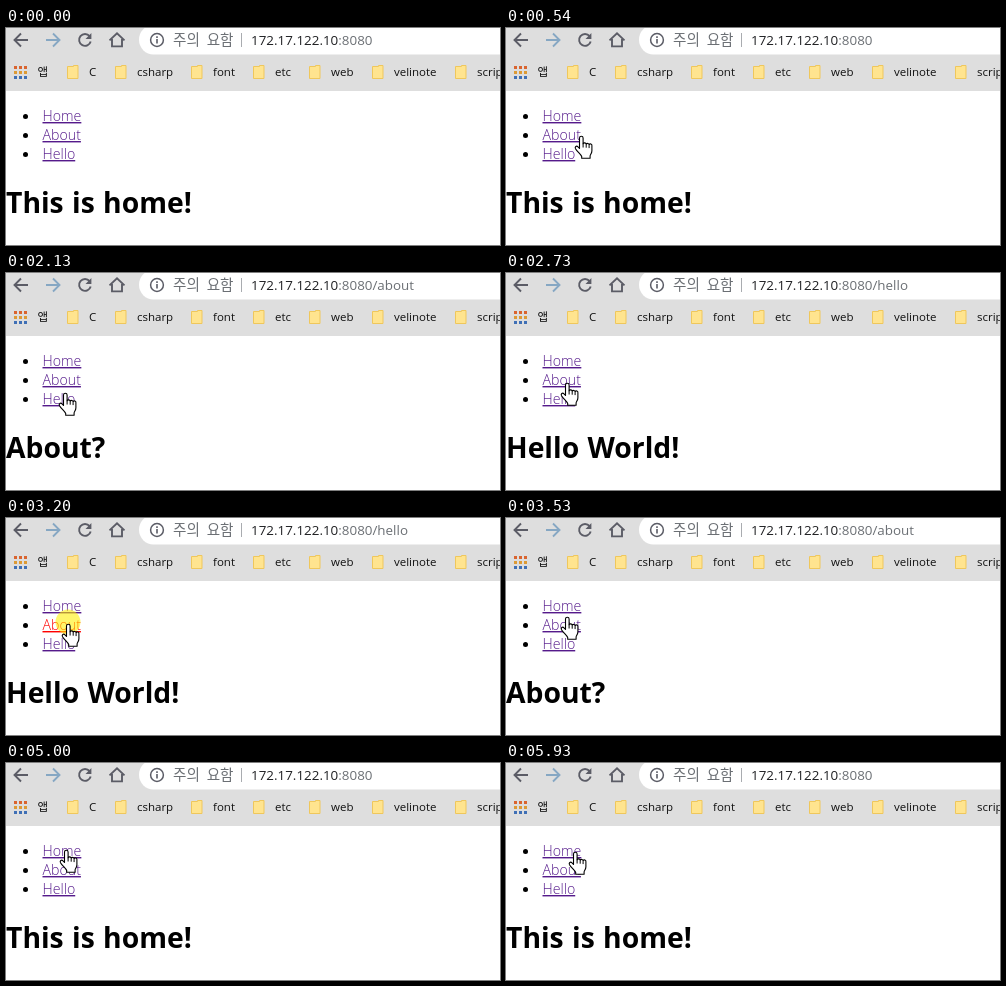
Write an HTML page that moves like this. It is 494 px wide and 217 px high and loops after 6.18 s.

```html
<!DOCTYPE html>
<html lang="ko">
<head>
<meta charset="utf-8">
<title>Page navigation</title>
<style>
html, body { margin: 0; width: 100%; height: 100%; overflow: hidden; background: #fff; }
svg { display: block; width: 494px; height: 217px; }
text { font-family: "Open Sans", "Noto Sans CJK KR", "Noto Sans CJK", "Noto Sans", sans-serif; white-space: pre; }
.mark { font-size: 11.5px; fill: #111; }
.notice { font-size: 14.6px; word-spacing: 3px; }
.url { font-size: 13.4px; fill: #202124; }
.dim { fill: #6b6f74; }
.link { font-size: 14.2px; font-weight: 300; fill: #551a8b; text-decoration: underline; }
.link.active { fill: #f00; }
.title { font-size: 28.3px; font-weight: 700; word-spacing: 1px; }
.icon { fill: none; stroke: #5b5c66; stroke-width: 1.9; }
</style>
</head>
<body>
<svg viewBox="0 0 494 217">
  <rect width="494" height="217" fill="#fff"/>
  <rect width="494" height="63" fill="#dedede"/>
  <rect x="133" y="-3" width="400" height="29.5" rx="14.7" fill="#fff"/>
  <g class="icon">
    <path d="M22 12H9M15 5.5L8.5 12L15 18.5"/>
    <path d="M40 12H53M47 5.5L53.5 12L47 18.5" stroke="#86a7c3" style="stroke:#86a7c3"/>
    <path d="M83.6 8.2A5.9 5.9 0 1 0 84.7 13.5"/>
    <path d="M85.4 5V10.9H79.5Z" style="fill:#5b5c66;stroke:none"/>
    <path d="M103.5 12.4L111 5.4L118.5 12.4M106 11V18.4H116V11"/>
    <circle cx="151" cy="12" r="6.4" style="stroke-width:1.5"/>
    <path d="M151 11V15.6M151 8.3V9.9" style="stroke-width:1.6"/>
  </g>
  <text x="167" y="17" class="notice dim">주의 요함</text>
  <path d="M235.5 5V19" stroke="#a9acb0"/>
  <text x="245" y="17" class="url">172.17.122.10<tspan class="dim" id="path"></tspan></text>
  <g id="apps"></g>
  <text x="31.5" y="48" class="mark">앱</text>
  <g id="marks"></g>
  <g id="links"></g>
  <text x="0" y="185" class="title" id="title"></text>
  <circle id="glow" r="12.5" fill="#fff000" opacity=".58"/>
  <g fill="#fff" stroke="#000" stroke-linejoin="round">
    <path id="arrow" d="M.5 .5V16.5L4.2 13L6.8 18.6L9.2 17.5L6.7 12.1H11.8Z"/>
    <g id="hand">
      <path stroke-width="1.1" d="M5.5 13.5V3a1.8 1.8 0 0 1 3.6 0V8.7a1.7 1.7 0 0 1 3.1 .4a1.6 1.6 0 0 1 2.9 .6a1.5 1.5 0 0 1 2.8 1V15.7C17.9 18.5 16.3 19.5 16.1 21V23.3H7.7V21.5C6.9 19.5 3.5 16.9 1.5 13.7C.5 11.7 2.5 10.3 4 11.8Z"/>
      <path fill="none" d="M9.1 8.5V12.5M12.2 9.3V12.7M15.1 10.1V13.1"/>
    </g>
  </g>
</svg>
<script>
const LOOP = 6180;
const STEP = 70;        // the pointer moves in small jumps
const LOAD_DELAY = 120; // from press to the new page
const NS = "http://www.w3.org/2000/svg";
const $ = id => document.getElementById(id);

function add(parent, tag, attrs, text = "") {
  const el = document.createElementNS(NS, tag);
  for (const key in attrs) el.setAttribute(key, attrs[key]);
  el.textContent = text;
  parent.appendChild(el);
  return el;
}

["#d9642f", "#dd9a35", "#3f6fb5"].forEach((fill, row) => {
  for (let col = 0; col < 3; col++) {
    add($("apps"), "rect", { x: 8 + col * 5, y: 38 + row * 5, width: 3, height: 3, fill });
  }
});

// Each bookmark follows the measured width of the one before it.
let markX = 61;
for (const label of ["C", "csharp", "font", "etc", "web", "velinote", "scripts"]) {
  add($("marks"), "path", {
    d: `M${markX + .5} 38.5h6v-1h4.5v13h-10.5z`, fill: "#ffe48f", stroke: "#efc75c"
  });
  const text = add($("marks"), "text", { x: markX + 22, y: 48, class: "mark" }, label);
  markX = Math.round(markX + 40.3 + text.getComputedTextLength());
}

const links = ["Home", "About", "Hello"].map((label, i) => {
  const y = 93 + i * 19;
  add($("links"), "circle", { cx: 19.5, cy: y - 4.5, r: 2.5 });
  return add($("links"), "text", { x: 36.5, y, class: "link" }, label);
});

const pages = [
  { path: ":8080", title: "This is home!" },
  { path: ":8080/about", title: "About?" },
  { path: ":8080/hello", title: "Hello World!" }
];

// Pointer strokes; some end in a press on a link.
const entry = { start: 70, x: 322, y: 194 };
const strokes = [
  { start: entry.start, end: 640, x: 61, y: 105, press: 1070, link: 1 },
  { start: 1420, end: 2130, x: 52, y: 119, press: 2280, link: 2 },
  { start: 2590, end: 2980, x: 55, y: 105, press: 3200, link: 1 },
  { start: 3320, end: 3850, x: 53, y: 95, press: 4680, link: 0 },
  { start: 4710, end: 5000, x: 53, y: 86 },
  { start: 5710, end: 5930, x: 62, y: 88 }
];

const easeOut = k => 1 - (1 - k) ** 2.7;

function pointerAt(t) {
  let { x, y } = entry;
  for (const s of strokes) {
    if (t < s.start) break;
    const stepped = Math.floor((t - s.start) / STEP) * STEP;
    const k = easeOut(t >= s.end ? 1 : stepped / (s.end - s.start));
    x += (s.x - x) * k;
    y += (s.y - y) * k;
  }
  return { x: Math.round(x), y: Math.round(y) };
}

function show(el, visible, x, y) {
  el.style.display = visible ? "" : "none";
  el.setAttribute("transform", `translate(${x} ${y})`);
}

function draw(t) {
  let page = 0, pressed = -1;
  for (const { press, link } of strokes) {
    if (t >= press + LOAD_DELAY) page = link;
    else if (t >= press) pressed = link;
  }
  $("path").textContent = pages[page].path;
  $("title").textContent = pages[page].title;
  links.forEach((el, i) => el.classList.toggle("active", i === pressed));

  const { x, y } = pointerAt(t);
  const entered = t >= entry.start;
  const overLink = x < 76;
  show($("arrow"), entered && !overLink, x, y);
  show($("hand"), entered && overLink, x, y);
  show($("glow"), pressed >= 0, x + 7, y - 1);
}

const began = performance.now();
function tick() {
  draw((performance.now() - began) % LOOP);
  requestAnimationFrame(tick);
}
tick();
</script>
</body>
</html>
```
